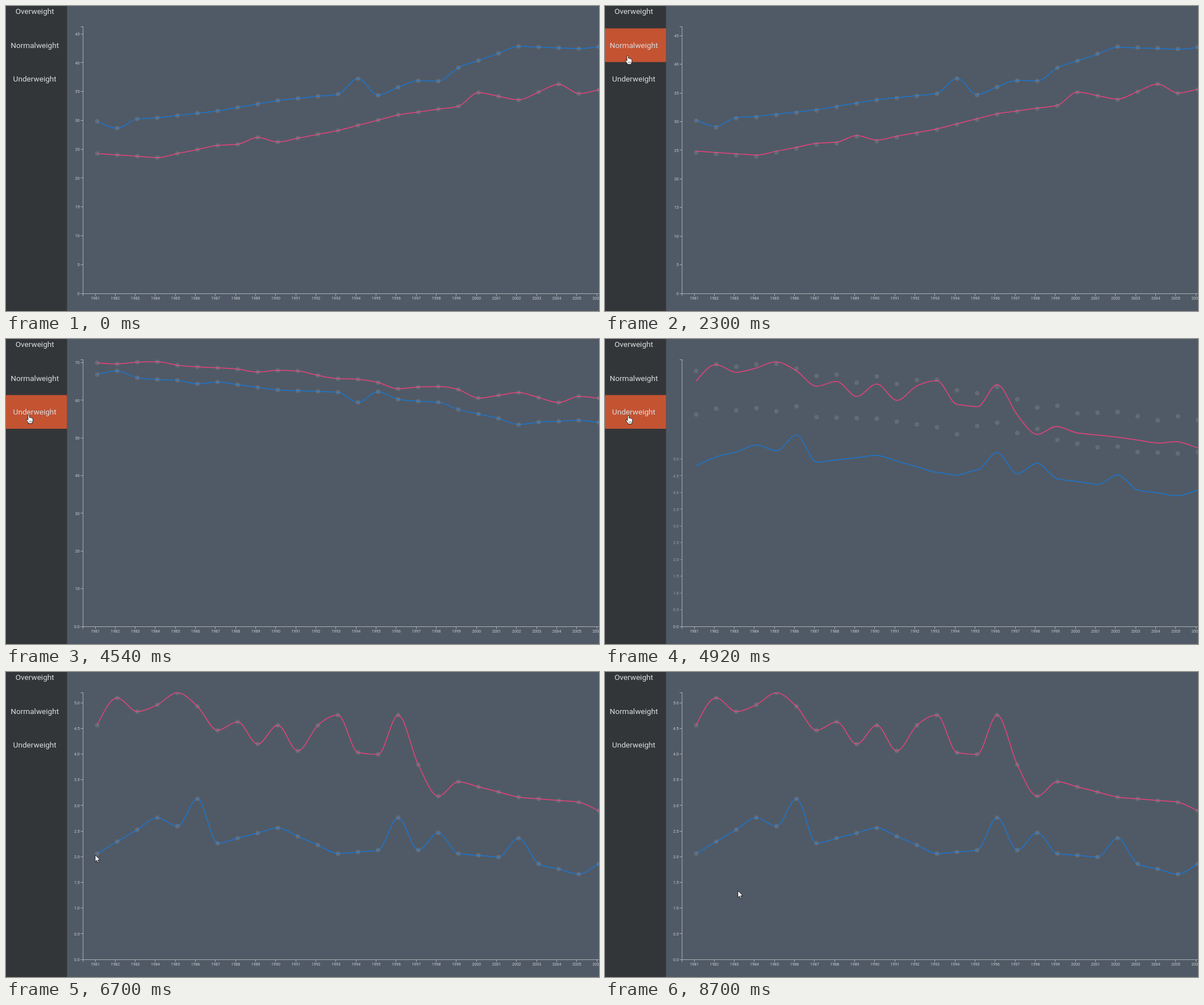
Write an HTML page with a canvas that moves like this. It is 1044 px wide and 537 px high and loops after 8.78 s.

```html
<!DOCTYPE html>
<html lang="en">
<head>
<meta charset="utf-8">
<title>Weight groups by year</title>
<style>
  html, body { margin: 0; width: 100%; height: 100%; overflow: hidden; background: #505a66; }
  canvas { display: block; }
</style>
</head>
<body>
<canvas id="stage" width="1044" height="537"></canvas>
<script>
const ctx = document.getElementById('stage').getContext('2d');
const LOOP = 8780, LEFT = 136, TOP = 36, BOTTOM = 506, STEP = 35.33, OFFSET = 3.5;
const FIRST_YEAR = 1981, YEARS = 27, AXIS_MS = 750, DOT_MS = 1000;

const lerp = (a, b, k) => a + (b - a) * k;
const clamp = k => Math.max(0, Math.min(1, k));
const ease = k => k < 0.5 ? 4 * k ** 3 : 1 - 4 * (1 - k) ** 3;
const smooth = k => k * k * (3 - 2 * k);

// A trend with one point every three years, and the years that stand out from it
const series = (trend, outliers) => Array.from({ length: YEARS }, (_, i) => {
  const j = Math.floor(i / 3);
  return lerp(trend[j], trend[j + 1], i % 3 / 3) + (outliers[FIRST_YEAR + i] || 0);
});

const people = [
  { color: '#1976d2',
    over: series([30.2, 30.8, 32, 33.8, 34.9, 36.1, 39.5, 43.2, 42.8, 43.8],
      { 1982: -1.4, 1994: 2.3, 1995: -1, 1998: -1.2 }),
    under: series([2.1, 2.8, 2.3, 2.6, 2.1, 2.2, 2.1, 2, 1.7, 2.3],
      { 1986: 0.7, 1996: 0.6, 1998: 0.37, 2002: 0.4 }) },
  { color: '#ec407a',
    over: series([24.6, 23.9, 26, 26.6, 28.6, 31.3, 32.8, 33.9, 35, 37],
      { 1989: 1, 2000: 2, 2001: 1, 2003: 1, 2004: 2 }),
    under: series([4.6, 5, 4.5, 4.1, 4.1, 4, 3.5, 3.2, 3.1, 2.6],
      { 1982: 0.4, 1985: 0.4, 1986: 0.3, 1988: 0.3, 1990: 0.5, 1992: 0.5, 1993: 0.7, 1996: 0.8, 1998: -0.45 }) }
];
const views = [
  { max: 46.3, tick: 5, digits: 0, pick: (p, i) => p.over[i] },
  { max: 71.03, tick: 10, digits: 0, pick: (p, i) => 99.85 - p.over[i] - p.under[i] },
  { max: 5.2, tick: 0.5, digits: 1, pick: (p, i) => p.under[i] }
];
const changes = [[-DOT_MS, 0, 0], [2174, 0, 1], [4512, 1, 2]];

const ITEM_H = 59.3, MENU_W = 107.5;
const menu = ['Overweight', 'Normalweight', 'Underweight']
  .map((label, i) => ({ label, top: -19.9 + i * ITEM_H }));

// time, x, y of the pointer tip
const pointer = [
  [70, 938, 503], [910, 64, 279], [1370, 11, 147], [1830, 40, 87], [3450, 40, 87],
  [3990, 40, 132], [5460, 41, 135], [6310, 157, 322], [7620, 159, 321], [8700, 234, 385]
];

const yOf = (value, view) => BOTTOM - (BOTTOM - TOP) * value / view.max;
const xOf = i => 157 + i * STEP;
const crisp = v => Math.floor(v) + 0.5;

// Slopes of a monotone cubic through evenly spaced heights
function slopes(ys) {
  const d = ys.slice(1).map((y, i) => (y - ys[i]) / STEP);
  const m = ys.map((_, i) => {
    const a = d[i - 1], b = d[i];
    if (a === undefined || b === undefined) return 0;
    return (Math.sign(a) + Math.sign(b)) * Math.min(Math.abs(a), Math.abs(b), Math.abs(a + b) / 4);
  });
  const n = ys.length - 1;
  m[0] = (3 * d[0] - m[1]) / 2;
  m[n] = (3 * d[n - 1] - m[n - 1]) / 2;
  return m;
}

for (const p of people) {
  p.shapes = views.map(view => {
    const ys = p.over.map((_, i) => yOf(view.pick(p, i), view) + OFFSET);
    return { ys, ms: slopes(ys) };
  });
}
for (const view of views) {
  view.ticks = [];
  for (let v = 0; v <= view.max; v += view.tick) view.ticks.push(v);
}

function line(x1, y1, x2, y2) {
  ctx.beginPath();
  ctx.moveTo(x1, y1);
  ctx.lineTo(x2, y2);
  ctx.stroke();
}

function text(str, x, y, align) {
  ctx.textAlign = align;
  ctx.fillText(str, x, y);
}

function drawAxes(from, to, k) {
  ctx.font = '7px Roboto, sans-serif';
  ctx.fillStyle = '#c6cacd';
  ctx.strokeStyle = '#a9afb5';
  ctx.lineWidth = 1;
  line(LEFT - 0.3, TOP, LEFT - 0.3, BOTTOM + 4.5);
  line(LEFT - 4.5, TOP + 0.5, LEFT, TOP + 0.5);
  line(LEFT - 4.5, BOTTOM + 0.5, 1044, BOTTOM + 0.5);
  for (let i = 0; i < YEARS; i++) {
    line(crisp(xOf(i)), BOTTOM, crisp(xOf(i)), BOTTOM + 4.5);
    text(FIRST_YEAR + i, xOf(i), BOTTOM + 11.3, 'center');
  }
  for (const v of new Set([...from.ticks, ...to.ticks])) {
    const old = from.ticks.includes(v), next = to.ticks.includes(v);
    const y = lerp(yOf(v, from), yOf(v, to), k);
    ctx.globalAlpha = old && next ? 1 : next ? k : 1 - k;
    line(LEFT - 4.5, crisp(y), LEFT, crisp(y));
    text(v.toFixed((next ? to : from).digits), LEFT - 6.3, y + 2.7, 'right');
  }
  ctx.globalAlpha = 1;
}

function drawSeries(p, from, to, lineK, dotK) {
  const a = p.shapes[from], b = p.shapes[to];
  const y = i => lerp(a.ys[i], b.ys[i], lineK);
  const bend = i => lerp(a.ms[i], b.ms[i], lineK) * STEP / 3;
  ctx.strokeStyle = p.color;
  ctx.lineWidth = 1.5;
  ctx.beginPath();
  ctx.moveTo(xOf(0) + OFFSET, y(0));
  for (let i = 1; i < YEARS; i++) {
    const x = xOf(i) + OFFSET;
    ctx.bezierCurveTo(x - STEP * 2 / 3, y(i - 1) + bend(i - 1), x - STEP / 3, y(i) - bend(i), x, y(i));
  }
  ctx.stroke();
  ctx.fillStyle = 'rgba(150,152,155,0.28)';
  a.ys.forEach((_, i) => {
    ctx.beginPath();
    ctx.arc(xOf(i) + OFFSET, lerp(a.ys[i], b.ys[i], dotK), 3.9, 0, Math.PI * 2);
    ctx.fill();
  });
}

function drawChart(t) {
  const [start, from, to] = changes.filter(c => c[0] <= t).pop();
  const lineK = ease(clamp((t - start) / AXIS_MS));
  const dotK = ease(clamp((t - start) / DOT_MS));
  ctx.save();
  ctx.beginPath();
  ctx.rect(MENU_W, TOP, 1044, 537);
  ctx.clip();
  drawAxes(views[from], views[to], lineK);
  for (const p of people) drawSeries(p, from, to, lineK, dotK);
  ctx.restore();
}

function pointerAt(t) {
  if (t < pointer[0][0]) return null;
  const i = pointer.findIndex(key => key[0] > t);
  if (i < 0) return pointer[pointer.length - 1].slice(1);
  const [t0, x0, y0] = pointer[i - 1], [t1, x1, y1] = pointer[i];
  const k = smooth((t - t0) / (t1 - t0));
  return [lerp(x0, x1, k), lerp(y0, y1, k)];
}

function drawMenu(active) {
  ctx.fillStyle = '#333638';
  ctx.fillRect(0, 0, MENU_W, 537);
  ctx.font = '13.6px Roboto, sans-serif';
  for (const item of menu) {
    if (item === active) {
      ctx.fillStyle = '#c45332';
      ctx.fillRect(0, item.top, MENU_W, ITEM_H);
    }
    ctx.fillStyle = '#d9dcde';
    text(item.label, 50.7, item.top + 34.2, 'center');
  }
}

const arrow = new Path2D('M0 0V12.2L2.8 9.6L4.7 13.8L6.6 13L4.8 8.9H8.7Z');
const hand = new Path2D('M-1.3 1.2Q0 -.6 1.3 1.2V5.2Q2.6 4.4 3.6 5.7Q4.8 5 5.7 6.3Q7.3 5.9 7.4 7.6V11' +
  'Q7.2 13 6.2 14V15.8H-.6V14.4L-4.2 9.8Q-4.8 7.8 -3 8.2L-1.3 9.8Z');
const creases = new Path2D('M1.3 11V13.5M3.2 11V13.5M5 11V13.5');

function drawPointer([x, y], overItem) {
  ctx.save();
  ctx.translate(Math.round(x), Math.round(y));
  ctx.fillStyle = '#fff';
  ctx.strokeStyle = '#111';
  ctx.lineWidth = 0.9;
  const shape = overItem ? hand : arrow;
  ctx.fill(shape);
  ctx.stroke(shape);
  if (overItem) {
    ctx.lineWidth = 0.6;
    ctx.stroke(creases);
  }
  ctx.restore();
}

function draw(t) {
  ctx.fillStyle = '#505a66';
  ctx.fillRect(0, 0, 1044, 537);
  drawChart(t);
  const at = pointerAt(t);
  const active = at && at[0] < MENU_W &&
    menu.find(item => at[1] >= item.top && at[1] < item.top + ITEM_H);
  drawMenu(active);
  if (at) drawPointer(at, active);
}

const begin = performance.now();
function tick() {
  draw((performance.now() - begin) % LOOP);
  requestAnimationFrame(tick);
}
tick();
</script>
</body>
</html>
```
